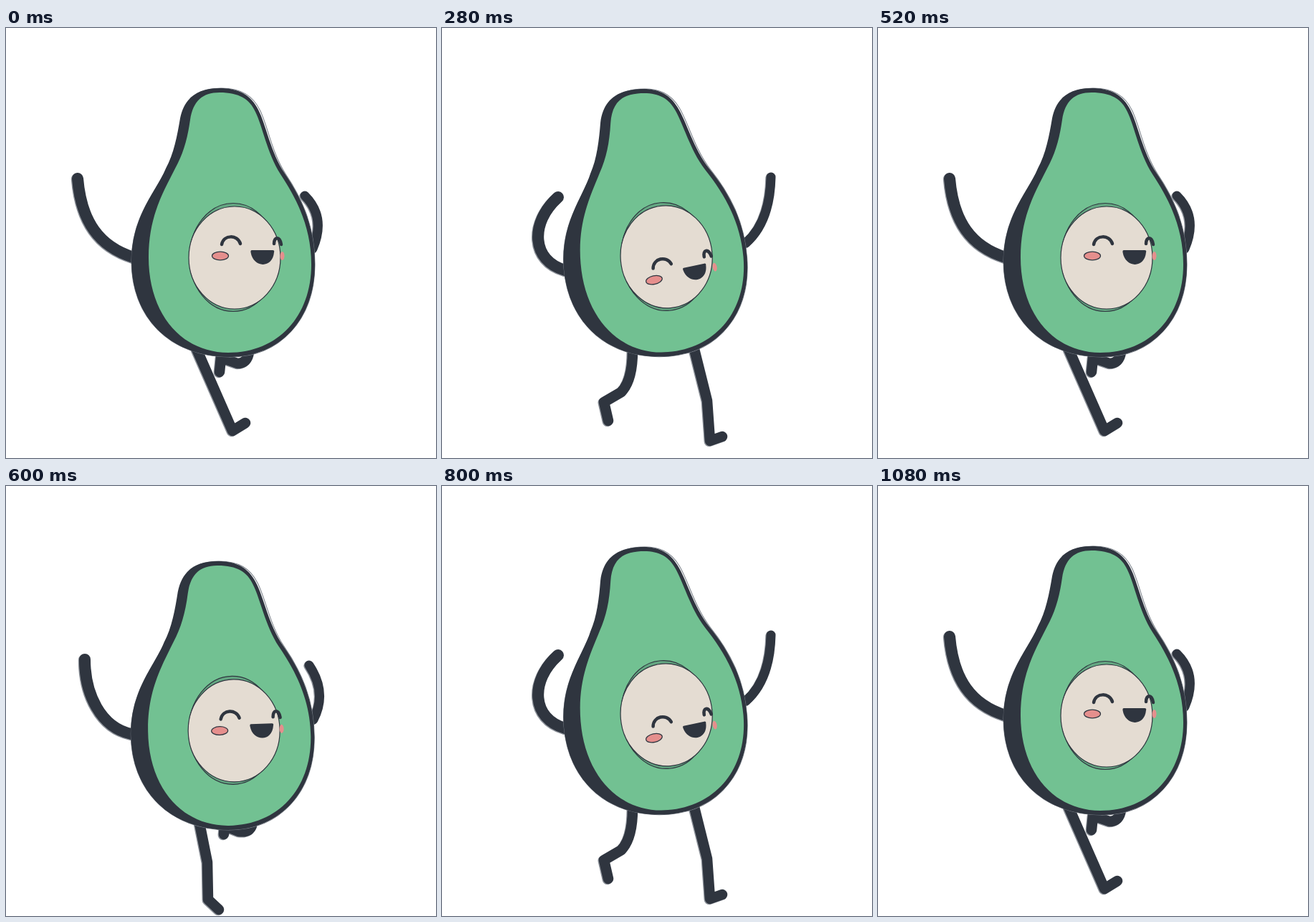
An HTML page that plays this animation: 600x600 px, repeating every 1.12 s.

```html
<!DOCTYPE html>
<html lang="en">
<head>
<meta charset="utf-8">
<title>Running avocado</title>
<style>
  html, body { margin: 0; height: 100%; overflow: hidden; background: #fff; }
  svg { display: block; width: 100vw; height: 100vh; }
  .line { fill: none; stroke: #2f353f; stroke-linecap: round; stroke-linejoin: round; }
  .limb { stroke-width: 14.5; }
  .shade { stroke: #8d929a; }
  .thin { stroke: #2f353f; stroke-width: 1.2; }
  .eyes { stroke-width: 4.5; }
</style>
</head>
<body>
<svg viewBox="0 0 600 600">
  <defs>
    <path id="skin" d="M298 84C266 84 249 98 243 126C239 150 234 176 223 196C210 228 175 262 175 325C175 405 230 459 312 459C384 459 431 405 431 330C431 278 413 238 389 203C369 173 363 135 352 114C342 94 326 84 298 84Z"/>
    <g id="limbs">
      <path id="far"/>
      <path id="near"/>
      <path id="left" stroke-width="16"/>
      <path id="right" stroke-width="13"/>
    </g>
  </defs>
  <use href="#limbs" class="line limb shade" x="-1.2" y="1"/>
  <use href="#limbs" class="line limb"/>
  <g id="body">
    <use href="#skin" fill="none" stroke="#777d86" transform="rotate(.6 300 330)"/>
    <use href="#skin" fill="#2f353f"/>
    <path fill="#72c192" d="M298 90C274 90 261 102 257 128C253 156 247 176 236 196C220 228 199 262 199 320C199 400 246 453 310 453C380 453 426 402 426 330C426 280 407 240 383 204C364 174 358 137 348 117C340 99 325 90 298 90Z"/>
    <ellipse class="thin" cx="317" cy="320" rx="61" ry="75.500" fill="#64a782"/>
    <ellipse class="thin" cx="319" cy="320.500" rx="64" ry="71.500" fill="#e4dcd2"/>
    <g id="face">
      <path class="line eyes" d="M301 302C304 288 323 288 327 301M374 301C374 291 382 290 384 302"/>
      <ellipse class="thin" cx="299" cy="318" rx="11.500" ry="5.800" fill="#e58f8d"/>
      <ellipse cx="385.500" cy="318" rx="3" ry="6" fill="#e58f8d"/>
      <path fill="#2f353f" d="M343 310L372 310Q375 310 374 313C372 336 345 335 341.500 313Q341 310 343 310Z"/>
    </g>
  </g>
</svg>
<script>
const LOOP = 1120, POSES = 8;

// One running cycle per leg
const near = [
  'M266 448L316 562L334 551',
  'M270 470L281 525L282 577L297 591',
  'M272 493Q276 540 268 552L259 570L266 594',
  'M270 474Q269 505 254 526L236 552L242 578',
  'M266 450Q266 492 250 508L226 522L232 548',
  'M268 472Q270 508 258 511L236 512L234 540',
  'M270 488Q274 518 265 518Q259 518 250 509L242 535',
  'M270 470Q284 496 270 495L255 489L250 514'
];
const far = [
  'M339 452Q337 468 323 468L300 460L298 480',
  'M343 474Q339 484 325 482L305 474L304 486',
  'M352 492Q366 506 350 506L331 496L330 518',
  'M356 468L397 576L411 563',
  'M352 448L370 520L374 576L391 570',
  'M350 470Q354 520 344 546L336 580L349 590',
  'M347 488Q348 516 334 525L313 539L320 563',
  'M344 470Q344 496 330 500L306 502L306 528'
];

// The arms and the bounce run to the middle of the cycle and back
const left = [
  'M100 210C105 270 130 305 178 320',
  'M110 242C110 290 132 337 175 346',
  'M131 276C112 310 118 365 175 375',
  'M154 259C120 290 125 345 172 357',
  'M162 236C122 272 125 325 172 338'
];
const right = [
  'M417 234C438 255 440 280 428 308',
  'M423 250C443 280 440 305 429 326',
  'M437 262C450 300 440 330 425 344',
  'M453 232C456 275 445 300 424 320',
  'M459 208C458 250 447 280 424 300'
];
const drop = [0, 21, 43, 21, 0];
const nod = [0, 2, 5, 27, 30, 28, 24, 10];

const part = id => document.getElementById(id);
const set = (id, name, value) => part(id).setAttribute(name, value);

function draw(now) {
  const tick = Math.floor(now % LOOP / 40);
  const i = Math.floor((tick + .5) * .6) % POSES;
  const m = Math.min(i, POSES - i);
  const lift = i === 6 ? -4 : 0;
  const lean = -2.4 * (1 - Math.cos(i * Math.PI / 4));

  set('near', 'd', near[i]);
  set('far', 'd', far[i]);
  set('left', 'd', left[m]);
  set('right', 'd', right[m]);
  for (const arm of ['left', 'right']) set(arm, 'transform', `translate(0 ${lift})`);
  set('body', 'transform', `translate(0 ${drop[m] + lift}) rotate(${lean} 302 390)`);
  set('face', 'transform', `translate(0 ${nod[i]}) rotate(${lean * 1.5} 325 318)`);
}

const start = performance.now();
function frame() {
  draw(performance.now() - start);
  requestAnimationFrame(frame);
}
draw(0);
requestAnimationFrame(frame);
</script>
</body>
</html>
```
